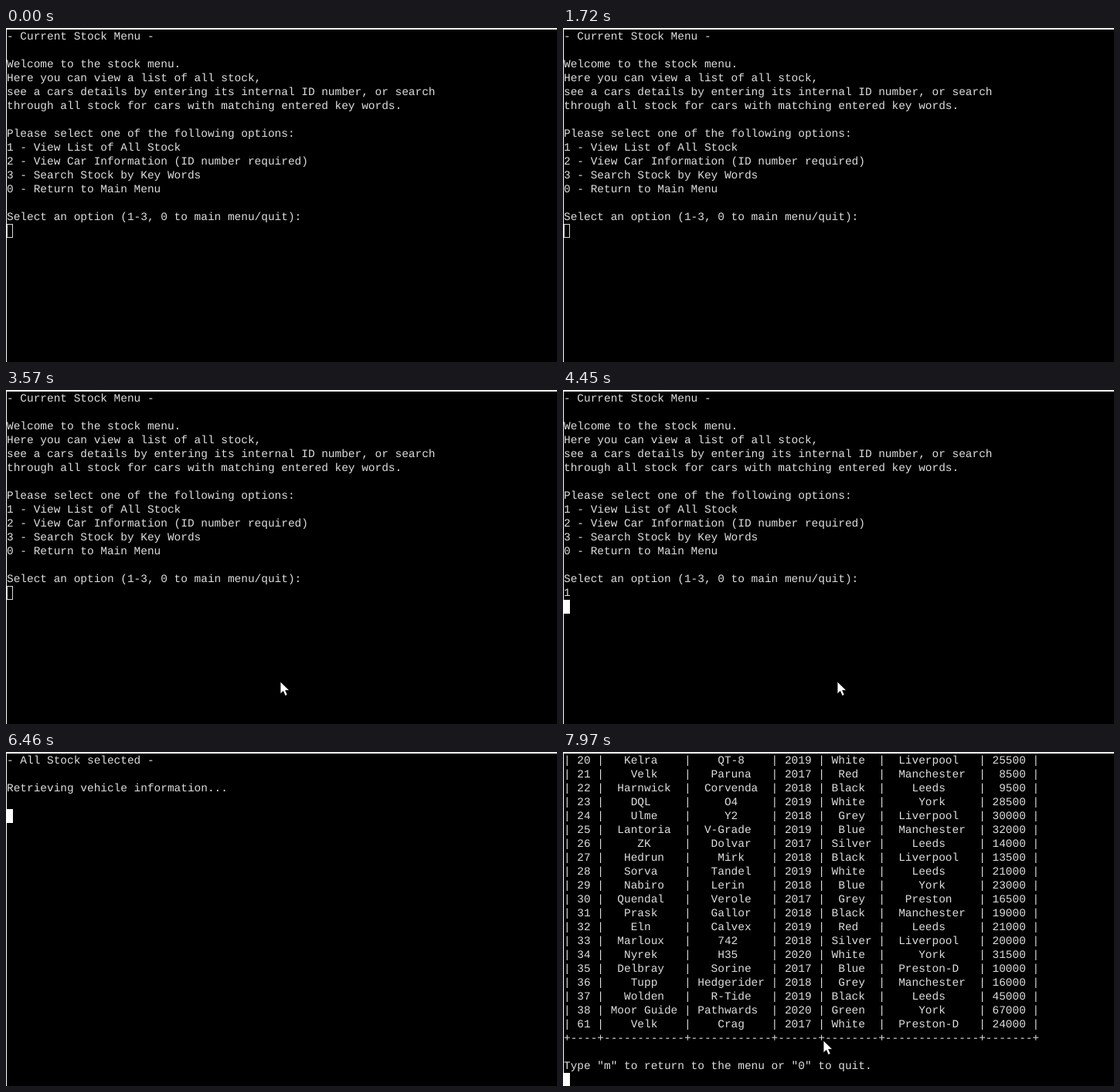
These frames come from a looping animation (713x433 px, 8 s). An HTML page:

```html
<!DOCTYPE html>
<html lang="en">
<head>
<meta charset="utf-8">
<style>
  html, body { margin: 0; width: 100%; height: 100%; overflow: hidden; background: #fff; }
  #term { position: absolute; left: 1px; top: 2px; right: 0; bottom: 0; overflow: hidden; background: #000; }
  pre {
    position: absolute; left: 0; top: 1px; margin: 0; color: #dedede;
    font: 14.444px/18px "Liberation Mono", monospace;
    text-rendering: geometricPrecision;
  }
  #cursor { position: absolute; left: 0; width: 8px; height: 18px; box-sizing: border-box; border: 1px solid #d8d8d8; }
  #cursor.focused { background: #fff; border-color: #fff; }
  #pointer { position: absolute; left: 0; top: 0; overflow: visible; }
</style>
</head>
<body>
<div id="term">
  <pre id="text"></pre>
  <div id="cursor"></div>
</div>
<svg id="pointer" width="14" height="20">
  <path d="M0 0V16L3.7 12.6L6.3 18.5L9.2 17.2L6.6 11.5H11.8Z" fill="#fff" stroke="#000" stroke-width=".8"/>
</svg>
<script>
const LOOP = 8000;
const $ = id => document.getElementById(id);
const text = $('text'), cursor = $('cursor'), pointer = $('pointer');

const menu = `- Current Stock Menu -

Welcome to the stock menu.
Here you can view a list of all stock,
see a cars details by entering its internal ID number, or search
through all stock for cars with matching entered key words.

Please select one of the following options:
1 - View List of All Stock
2 - View Car Information (ID number required)
3 - Search Stock by Key Words
0 - Return to Main Menu

Select an option (1-3, 0 to main menu/quit):
`;

const loading = `- All Stock selected -

Retrieving vehicle information...`;

const stock = `20,Kelra,QT-8,2019,White,Liverpool,25500
21,Velk,Paruna,2017,Red,Manchester,8500
22,Harnwick,Corvenda,2018,Black,Leeds,9500
23,DQL,O4,2019,White,York,28500
24,Ulme,Y2,2018,Grey,Liverpool,30000
25,Lantoria,V-Grade,2019,Blue,Manchester,32000
26,ZK,Dolvar,2017,Silver,Leeds,14000
27,Hedrun,Mirk,2018,Black,Liverpool,13500
28,Sorva,Tandel,2019,White,Leeds,21000
29,Nabiro,Lerin,2018,Blue,York,23000
30,Quendal,Verole,2017,Grey,Preston,16500
31,Prask,Gallor,2018,Black,Manchester,19000
32,Eln,Calvex,2019,Red,Leeds,21000
33,Marloux,742,2018,Silver,Liverpool,20000
34,Nyrek,H35,2020,White,York,31500
35,Delbray,Sorine,2017,Blue,Preston-D,10000
36,Tupp,Hedgerider,2018,Grey,Manchester,16000
37,Wolden,R-Tide,2019,Black,Leeds,45000
38,Moor Guide,Pathwards,2020,Green,York,67000
61,Velk,Crag,2017,White,Preston-D,24000`;

const widths = [4, 12, 12, 6, 8, 14, 7];
const center = (s, w) => s.padStart(s.length + Math.floor((w - s.length) / 2)).padEnd(w);
const tableRow = line => '|' + line.split(',')
  .map((cell, i) => center(i === 6 ? cell.padStart(5) : cell, widths[i])).join('|') + '|';
const rule = '+' + widths.map(w => '-'.repeat(w)).join('+') + '+';
const table = [...stock.split('\n').map(tableRow), rule, '',
  'Type "m" to return to the menu or "0" to quit.'].join('\n');

// Each state holds from its start time: [ms, screen text, cursor row, focused, cursor column]
const states = [
  [0, menu, 14, false],
  [3740, menu, 14, true],
  [4010, menu + '1', 14, true, 1],
  [4360, menu + '1', 15, true],
  [4610, loading, 4, true],
  [6890, table, 23, true],
];

function pointerAt(t) {
  if (t >= 3070 && t < 5570) {
    const p = Math.min(1, (t - 3070) / 500);
    return [355, 378 + 55 * (1 - p) ** 2];
  }
  return t >= 7040 ? [337, 374] : null;
}

let shown;
function draw() {
  const t = performance.now() % LOOP;
  const state = states.filter(s => s[0] <= t).pop();
  if (state !== shown) {
    const [, content, row, focused, col = 0] = shown = state;
    text.textContent = content;
    cursor.style.top = row * 18 + 'px';
    cursor.style.left = col * 8.667 + 'px';
    cursor.className = focused ? 'focused' : '';
  }
  const pos = pointerAt(t);
  pointer.style.display = pos ? 'block' : 'none';
  if (pos) pointer.style.transform = `translate(${pos[0]}px, ${pos[1]}px)`;
  requestAnimationFrame(draw);
}
draw();
</script>
</body>
</html>
```
